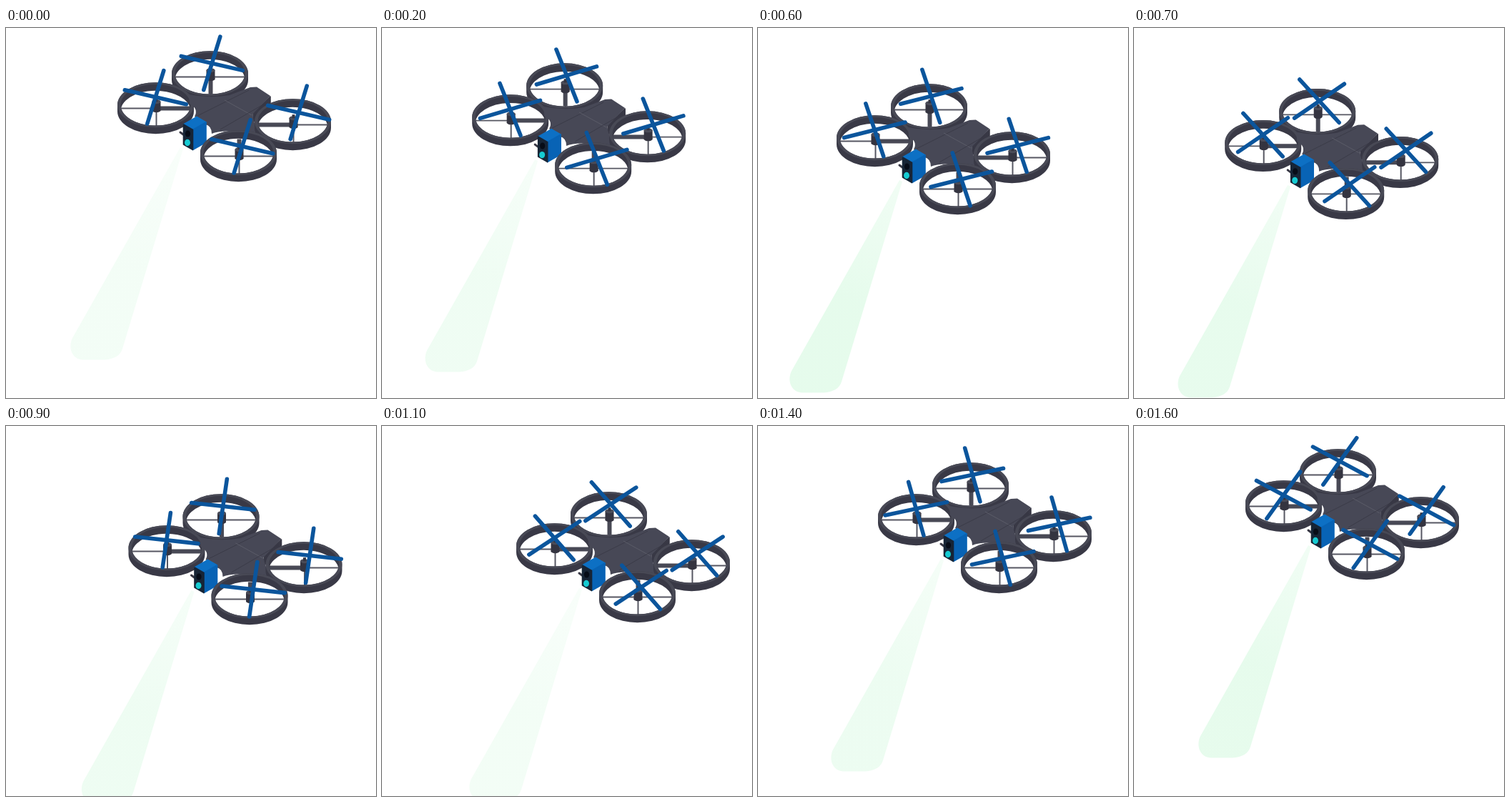
An HTML page with a canvas that plays this animation: 518x518 px, repeating every 1.7 s.

```html
<!DOCTYPE html>
<html lang="en">
<head>
<meta charset="utf-8">
<title>Drone</title>
<style>
  html, body { margin: 0; width: 100%; height: 100%; overflow: hidden; background: #fff; }
  canvas { display: block; width: 100vw; height: 100vh; }
</style>
</head>
<body>
<canvas id="stage" width="518" height="518"></canvas>
<script>
const ctx = document.getElementById('stage').getContext('2d');
const SIZE = 518, STEP = 100, STEPS = 17, TAU = Math.PI * 2;

const color = {
  wall: '#393946', rim: '#484955', body: '#474856', side: '#383845', strut: '#565762',
  seam: '#60616c', hub: '#343440', hubTop: '#4b4c58', blade: '#0b559c'
};

// Key poses of the flight: step, x, y
const flight = [[0, 0, 0], [4, -50, 33], [6, -46, 46], [9, 15.5, 63], [11, 32, 60], [14, 12, 19], [16, 0, 0]];

// Slope of a coordinate at a key, from the parabola through its neighbours
function slope(k, axis) {
  const rise = n => (flight[n + 1][axis] - flight[n][axis]) / (flight[n + 1][0] - flight[n][0]);
  if (k === 0) return rise(0);
  if (k === flight.length - 1) return rise(k - 1);
  const before = flight[k][0] - flight[k - 1][0], after = flight[k + 1][0] - flight[k][0];
  return (rise(k - 1) * after + rise(k) * before) / (before + after);
}

// Smooth Hermite curve through the key poses
function flightAt(step, axis) {
  const k = Math.max(0, flight.findIndex(key => key[0] >= step) - 1);
  const from = flight[k], to = flight[k + 1], span = to[0] - from[0];
  const s = (step - from[0]) / span, r = 1 - s;
  return r * r * (1 + 2 * s) * from[axis] + s * s * (3 - 2 * s) * to[axis]
    + span * s * r * (r * slope(k, axis) - s * slope(k + 1, axis));
}

const beamAlpha = step => 0.47 - 0.17 * Math.cos(TAU * step / 11.3);

// Speeds up slightly at first, then turns steadily
const bladeAngle = step => (105 - 22.2 * step + 12 * (1 - Math.exp(-step))) * Math.PI / 180;

// Rotors stand on a skewed two by two grid; the blades float above on a wider one
function rotor(i, j) {
  return {
    i, j,
    x: 305.5 + 58 * i - 38 * j, y: 119.2 + 33.5 * i + 22 * j,
    px: 309.5 + 60.7 * i - 39.5 * j, py: 107.6 + 34.5 * i + 23.7 * j
  };
}
const back = rotor(-1, -1), left = rotor(-1, 1), right = rotor(1, -1), front = rotor(1, 1);
const rotors = [back, left, right, front];
const RX = 53.5, RY = 31.5, WALL = 9, RIM_X = 4.5, RIM_Y = 2.6;

function line(x1, y1, x2, y2, width, stroke, cap = 'butt') {
  ctx.beginPath();
  ctx.moveTo(x1, y1);
  ctx.lineTo(x2, y2);
  ctx.lineWidth = width;
  ctx.lineCap = cap;
  ctx.strokeStyle = stroke;
  ctx.stroke();
}

function oval(x, y, rx, ry, fill) {
  ctx.beginPath();
  ctx.ellipse(x, y, rx, ry, 0, 0, TAU);
  ctx.fillStyle = fill;
  ctx.fill();
}

// Parallelogram from a corner and two edges, with slightly rounded corners
function face(x, y, [ux, uy], [vx, vy], fill) {
  ctx.beginPath();
  ctx.moveTo(x, y);
  ctx.lineTo(x + ux, y + uy);
  ctx.lineTo(x + ux + vx, y + uy + vy);
  ctx.lineTo(x + vx, y + vy);
  ctx.closePath();
  ctx.fillStyle = ctx.strokeStyle = fill;
  ctx.lineWidth = 1.6;
  ctx.lineJoin = 'round';
  ctx.fill();
  ctx.stroke();
}

function drawBeam(alpha) {
  const glow = ctx.createLinearGradient(246, 166, 130, 450);
  glow.addColorStop(0, `rgba(215,249,225,${alpha * 0.55})`);
  glow.addColorStop(0.6, `rgba(215,249,225,${alpha})`);
  ctx.beginPath();
  ctx.moveTo(244, 167);
  ctx.lineTo(93, 434);
  ctx.bezierCurveTo(87, 446, 91, 463, 107, 464.5);
  ctx.lineTo(138, 464.5);
  ctx.quadraticCurveTo(159, 463, 163, 449);
  ctx.lineTo(248, 169);
  ctx.fillStyle = glow;
  ctx.fill();
}

function drawRing({ i, j, x, y }) {
  const rx = RX - RIM_X, ry = RY - RIM_Y, mid = y + 4.8, cx = x + 1;
  line(x - rx, mid, x + rx, mid, 1.8, color.strut);
  line(cx, mid, cx, y + ry + 1, 2, color.strut);
  if (i === j) line(cx, mid, cx, mid - 24 * i, 6, color.rim);
  else line(cx, mid, cx - 50 * i, mid, 6, color.rim);

  // Walls with the see-through opening cut out
  const dip = Math.asin(WALL / 2 / ry);
  ctx.beginPath();
  ctx.ellipse(x, y, RX, RY, 0, Math.PI, 0);
  ctx.ellipse(x, y + WALL, RX, RY, 0, 0, Math.PI);
  ctx.closePath();
  ctx.moveTo(x + rx * Math.cos(dip), y + WALL / 2);
  ctx.ellipse(x, y, rx, ry, 0, dip, Math.PI - dip);
  ctx.ellipse(x, y + WALL, rx, ry, 0, Math.PI + dip, -dip);
  ctx.closePath();
  ctx.fillStyle = color.wall;
  ctx.fill('evenodd');

  // Upper face of the rim
  ctx.beginPath();
  ctx.ellipse(x, y, RX, RY, 0, 0, TAU);
  ctx.moveTo(x + rx, y);
  ctx.ellipse(x, y, rx, ry, 0, 0, TAU);
  ctx.fillStyle = color.rim;
  ctx.fill('evenodd');
}

function drawHub({ x, y }) {
  const cx = x + 1, top = y - 4.5, bottom = y + 7.5;
  oval(cx, bottom, 6, 3, color.hub);
  ctx.fillRect(cx - 6, top, 12, bottom - top);
  oval(cx, top, 6, 3, color.hubTop);
  line(cx, top, cx, top - 5, 4, color.hub);
}

function drawBody() {
  face(346, 119, [24, -23], [0, 13], color.side);
  ctx.beginPath();
  ctx.moveTo(256, 93);
  ctx.quadraticCurveTo(284, 99, 313, 94);
  ctx.lineTo(342, 83);
  ctx.lineTo(351, 82.5);
  ctx.lineTo(370, 95);
  ctx.lineTo(345, 121);
  ctx.quadraticCurveTo(347, 135, 356, 150);
  ctx.quadraticCurveTo(305, 140, 288, 148);
  ctx.quadraticCurveTo(288, 137, 279, 135);
  ctx.lineTo(264, 124);
  ctx.quadraticCurveTo(270, 113, 257, 106);
  ctx.fillStyle = color.body;
  ctx.fill();
  line(268, 123, 340, 87, 0.8, color.side);
  line(306, 101, 344, 122, 0.8, color.seam);
  line(300, 142, 367, 103, 0.8, color.side);
}

function drawCamera() {
  const across = [13, 7.5], deep = [18.5, -10.5], down = [0, 28];
  line(244, 146, 248, 149, 3, color.side, 'round');
  face(248.5, 135, across, deep, '#0d70c4');
  face(261.5, 142.5, deep, down, '#0863b5');
  face(248.5, 135, across, down, '#172536');
  oval(254.5, 148, 3.6, 4.6, '#070d18');
  oval(254, 160.5, 4, 4.7, '#16cbd2');
}

function drawPropeller({ px, py }, angle) {
  for (const a of [angle, angle + Math.PI / 2]) {
    const dx = 44.5 * Math.cos(a), dy = 38.5 * Math.sin(a);
    line(px - dx, py - dy, px + dx, py + dy, 5.6, color.blade, 'round');
  }
}

function render(now) {
  const step = Math.floor(now / STEP) % STEPS;
  ctx.setTransform(1, 0, 0, 1, 0, 0);
  ctx.fillStyle = '#fff';
  ctx.fillRect(0, 0, SIZE, SIZE);
  ctx.translate(flightAt(step, 1), flightAt(step, 2));

  drawBeam(beamAlpha(step));
  drawRing(back);
  drawRing(left);
  drawBody();
  drawRing(right);
  oval(front.x, front.y + 3, RX - 3, RY - 3, '#fff'); // clears the front opening
  drawCamera();
  drawRing(front);
  rotors.forEach(drawHub);
  rotors.forEach(r => drawPropeller(r, bladeAngle(step)));
}

const start = performance.now();
function tick() {
  render(performance.now() - start);
  requestAnimationFrame(tick);
}
tick();
</script>
</body>
</html>
```
